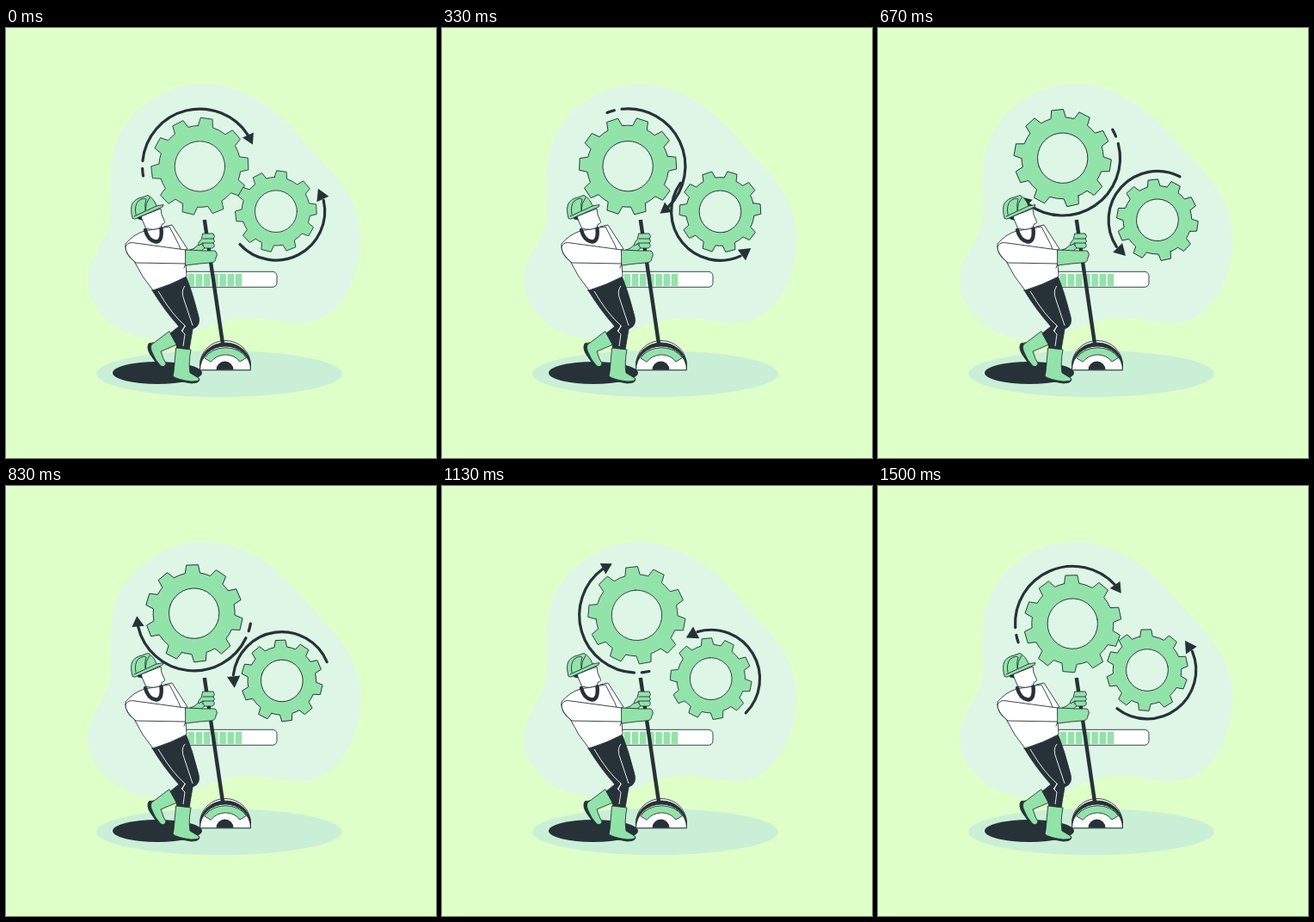
Animation, 500 px wide and 500 px high, one loop 1540 ms. Source, as an HTML page:

```html
<!DOCTYPE html>
<html lang="en">
<head>
<meta charset="utf-8">
<title>Turning gears</title>
<style>
  html, body { margin: 0; height: 100%; overflow: hidden; background: #deffc8; }
  svg { display: block; width: 100vw; height: 100vh; }
  .ink { fill: #263238; }
  .green { fill: #92e3a9; }
  .white { fill: #fff; }
  .edge { stroke: #263238; stroke-width: .9; stroke-linejoin: round; stroke-linecap: round; }
  .line { fill: none; }
  .arc { fill: none; stroke: #263238; stroke-width: 3.2; stroke-linecap: round; }
</style>
</head>
<body>
<svg viewBox="0 0 500 500">
  <path fill="#def6e6" d="M232 65C268 66 309 86 345 130C371 162 412 190 412 246C412 295 385 343 342 343C312 343 300 333 262 339C235 343 215 362 178 362C130 362 95 325 95 295C95 262 122 248 122 215C122 190 119 165 127 138C140 95 185 64 232 65Z"/>
  <ellipse fill="#c9f0d6" cx="248" cy="402" rx="143" ry="27"/>
  <ellipse class="ink" cx="176" cy="401" rx="52" ry="13"/>

  <g id="big"></g>
  <g id="small"></g>

  <rect class="white edge" x="185" y="283.3" width="130" height="18" rx="5"/>
  <g id="bars" class="green"></g>

  <!-- lever -->
  <g class="edge">
    <path class="white" d="M225.5 397V392A29.5 28.5 0 0 1 284.5 392V397Z"/>
    <path class="ink" d="M225.5 397V393A29.5 27 0 0 1 284.5 393V397Z"/>
    <path class="white" d="M225.5 397.5A29.5 27.5 0 0 1 284.5 397.5Z"/>
    <path class="green" d="M231 383.5A27 21 0 0 1 279.5 383.5L272 388A20 18 0 0 0 238.5 388Z"/>
  </g>
  <path class="ink" d="M244.5 397.5A10 10 0 0 1 264.5 397.5Z"/>
  <path stroke="#263238" stroke-width="4.4" d="M230.8 223L252 367"/>

  <!-- boots and trousers -->
  <g class="edge">
    <path class="ink" d="M166 367Q163 372 168 380L178 394Q184 396 185 391L174 366Z"/>
    <path class="green" d="M190 353L199 368L180 376Q183 386 186 390Q185 395 180 393Q173 386 169 375Q167 368 172 366Z"/>
    <path class="ink" d="M170 305L209 288Q217 308 223 332Q228 346 217 350L213 374H199L198 368L191 355L201 347Q184 328 170 305Z"/>
    <path class="ink" d="M194 404Q193 409 199 410L215 413Q226 413 225 408Z"/>
    <path class="green" d="M198 372L215 374Q212 390 214 401L224 407Q227 411 215 411Q200 409 194 405L195 400Z"/>
  </g>
  <path class="line" stroke="#fff" stroke-width=".9" d="M177 306Q192 332 208 346L205 353M209 346L204 352L208 356L206 370M208 300Q203 306 207 316L217 346"/>

  <!-- torso and back arm -->
  <g class="edge">
    <path class="green" d="M209 260L219 256L226 250L232 255L226 260Z"/>
    <path class="white" d="M184 231L193 229L211 257L203 261Z"/>
    <path class="white" stroke="none" d="M163 225L182 225V238L172 249L162 240Z"/>
    <path class="white" d="M161 236L190 231Q202 251 209 273L210 289Q191 299 171 305Q158 290 149 271Q138 264 139 251Q148 240 161 236Z"/>
    <path class="white" d="M139 254Q142 248 150 250L209 258L210 274L151 273Q138 262 139 254Z"/>
    <path class="line" d="M209 274L207 279"/>
    <path class="line" style="stroke-width:4.4" d="M162 235Q165 247 174 248.5Q182 249 180.5 233"/>
  </g>

  <!-- head -->
  <g class="edge">
    <path class="white" d="M157 219L180 210Q180 217 184 224Q186 227 181.500 228L180 232Q172 236 163 233Z"/>
    <path class="ink" d="M152 220L157 218L158 223L154 222Z"/>
    <path class="green" d="M147 221Q144 210 147 204Q151 198 158 197L165 194.5Q172 198 175 207L183 205.5L182 208L150 222Z"/>
    <path class="line" d="M151 217Q149 206 154 201Q160 197 163 199Q161 204 162 212M162 212Q162 204 167 197M149 219L175 207"/>
  </g>

  <!-- gloves -->
  <g class="green edge">
    <path d="M229 239L241 239Q244 243 241 245Q244 248 241 250Q244 254 240 256H231Q228 253 229 250L224 253Q222 251 227 246Z"/>
    <path class="line" d="M229 245H241M229 250H241"/>
    <path d="M209 258L231 259L243 259Q247 263 244 267Q244 273 237 273L225 274L209 276Z"/>
  </g>
</svg>
<script>
const LOOP = 1540, STEPS = 37, TAU = Math.PI * 2;
// The teeth are drawn slightly uneven, alike on both wheels.
const TEETH = [278, 319, 357, 390, 428, 464, 497, 533, 569, 603];
const $ = id => document.getElementById(id);

const at = (r, deg) => {
  const a = deg * TAU / 360;
  return `${(r * Math.cos(a)).toFixed(2)} ${(r * Math.sin(a)).toFixed(2)}`;
};

const arc = (r, from, to) =>
  `M${at(r, from)}A${r} ${r} 0 ${Math.abs(to - from) > 180 ? 1 : 0} ${to > from ? 1 : 0} ${at(r, to)}`;

function gear(scale) {
  const root = 47.5 * scale, tip = 56.7 * scale, hole = 29.2 * scale;
  const valley = `A${root} ${root} 0 0 1 `;
  const teeth = TEETH.map(a =>
    `${at(root, a - 10.5)}L${at(tip, a - 7)}L${at(tip, a + 7)}L${at(root, a + 10.5)}`);
  const rim = `M${teeth.join(valley)}${valley}${at(root, TEETH[0] - 10.5)}Z`;
  return `<path class="green edge" fill-rule="evenodd" d="${rim}${arc(hole, 0, 180)}A${hole} ${hole} 0 0 1 ${hole} 0Z"/>`;
}

const wheel = (x, y, scale, arcs, head) =>
  `<g transform="translate(${x} ${y})">${gear(scale)}<path class="arc" d="${arcs}"/><path class="ink" d="${head}"/></g>`;

$('big').innerHTML = wheel(225.4, 160.9, 1,
  arc(66.8, 185.5, 327) + arc(66.8, 170.5, 178), 'M62.5 -39.5L49.5 -33.5L61.5 -25.5Z');
$('small').innerHTML = wheel(313.9, 213.2, .837,
  arc(56.8, 137.5, -13), 'M49 -26.5L61.5 -17.5L47.5 -11Z');

for (let x = 211.5; x < 270; x += 9.2)
  $('bars').innerHTML += `<rect x="${x}" y="285.7" width="7.6" height="14.5"/>`;

function draw(now) {
  const step = Math.floor(now % LOOP / LOOP * STEPS + .13);
  const p = step / STEPS, w = p * TAU;
  const turn = 360 * p + 2.5 * (1 - Math.cos(w)) - 1.5 * Math.sin(w);
  $('big').setAttribute('transform', `rotate(${turn} 220.9 155.1)`);
  $('small').setAttribute('transform', `rotate(${turn} 318.5 219.2)`);
}

const start = performance.now();
function tick() {
  draw(performance.now() - start);
  requestAnimationFrame(tick);
}
tick();
</script>
</body>
</html>
```
